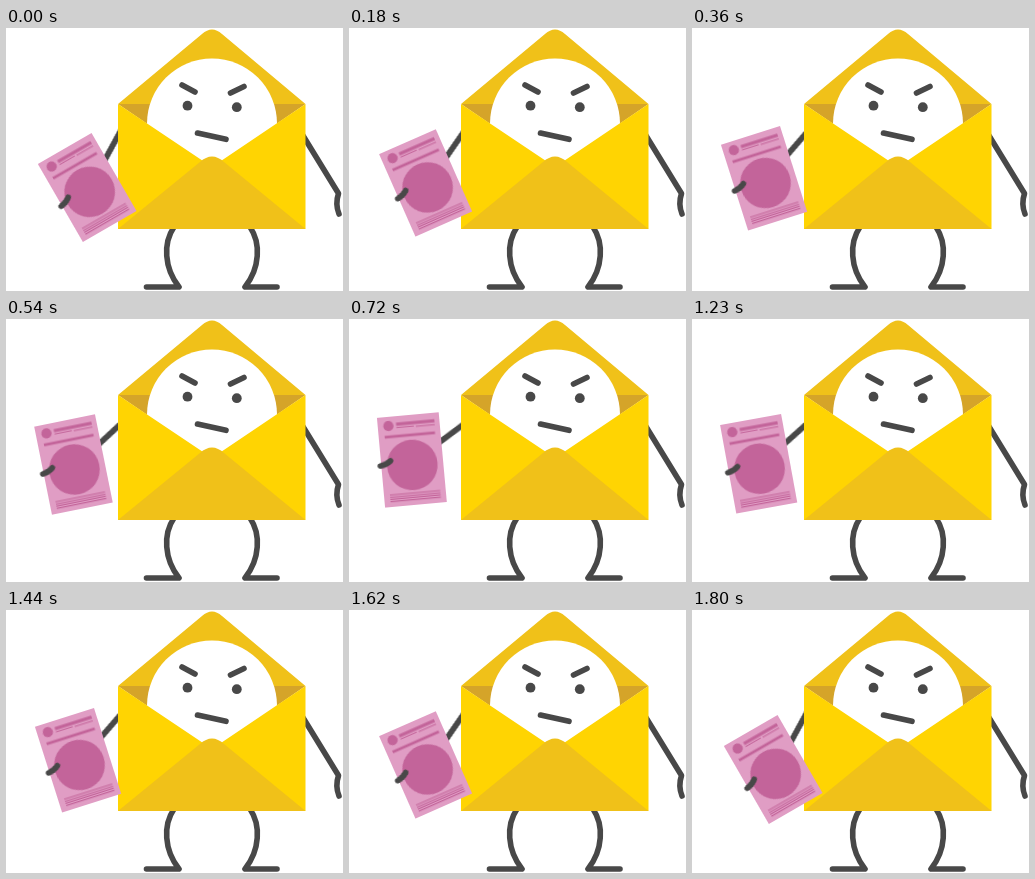
Write an HTML page without scripts that moves like this. It is 337 by 263 pixels and loops after 1830 ms.

```html
<!DOCTYPE html>
<html lang="en">
<head>
<meta charset="utf-8">
<title>Grumpy envelope</title>
<style>
  html, body { margin: 0; width: 100%; height: 100%; overflow: hidden; background: #fff; }
  svg { display: block; width: 100%; height: 100%; }

  .line { fill: none; stroke: #484848; stroke-width: 5.6; stroke-linecap: round; stroke-linejoin: round; }
  .ink { fill: #484848; }
  .flap { fill: #f0c119; }
  .inside { fill: #d5a429; }
  .body { fill: #ffd402; }
  .paper { fill: #e09dc4; }
  .print { fill: #c3649a; }
  .rule { fill: none; stroke: #c3649a; }

  /* arm, card and hand share one swing, advancing every 30ms */
  .swing { animation: swing 1830ms -1ms infinite; }
  @keyframes swing {
    0% {
      transform: translate(81.2px, 159.5px) rotate(-30deg);
      animation-timing-function: steps(30);
    }
    49.1803% {
      transform: translate(58.3px, 136.3px) rotate(1deg);
      animation-timing-function: steps(30);
    }
    98.3607%, 100% { transform: translate(81.2px, 159.5px) rotate(-30deg); }
  }
</style>
</head>
<body>
<svg viewBox="0 0 337 263">
  <!-- limbs behind the envelope -->
  <g class="line">
    <path d="M168 199C157 215 158 240 173 259H140.5"/>
    <path d="M244 199C255 215 254 240 239 259H271"/>
    <path d="M296 106L332.5 165.5Q329 176 333 186"/>
    <path class="swing" d="M20 -9.5L60 -34"/>
  </g>

  <!-- envelope and face -->
  <path class="flap" d="M112 76L196 6Q206 -3 216 6L299.5 76Z"/>
  <path class="inside" d="M112 76H299.5L206 140Z"/>
  <circle cx="206" cy="95.5" r="65" fill="#fff"/>
  <path class="body" d="M112 76L206 139L299.5 76V201H112Z"/>
  <path class="flap" d="M112 201L194 134Q206 123 218 134L299.5 201Z"/>
  <path class="line" d="M176 57L189 64M224.5 65L238 58.5M191.5 105L220 111.3"/>
  <g class="ink">
    <circle cx="181.5" cy="77.7" r="4.9"/>
    <circle cx="230.8" cy="79.2" r="4.9"/>
  </g>

  <!-- card, centred on its own origin -->
  <g class="swing">
    <rect class="paper" x="-31" y="-45" width="62" height="90"/>
    <g class="print">
      <circle cy="5" r="25.3"/>
      <circle cx="-20.3" cy="-35.8" r="5.1"/>
      <rect x="-12.5" y="-38.6" width="38.5" height="3.2"/>
      <rect x="-25" y="-26.4" width="50.5" height="2.8"/>
    </g>
    <path class="rule" d="M-12.5 -33.6H5M7 -33.1H26"/>
    <path class="rule" stroke-width="1.1" d="M-25 33H25.5M-25 35.2H25.5M-25 37.4H25.5M-25 39.6H25.5"/>
    <path class="line" d="M-32 3.2Q-25.5 2.4 -21.3 -1"/>
  </g>
</svg>
</body>
</html>
```
